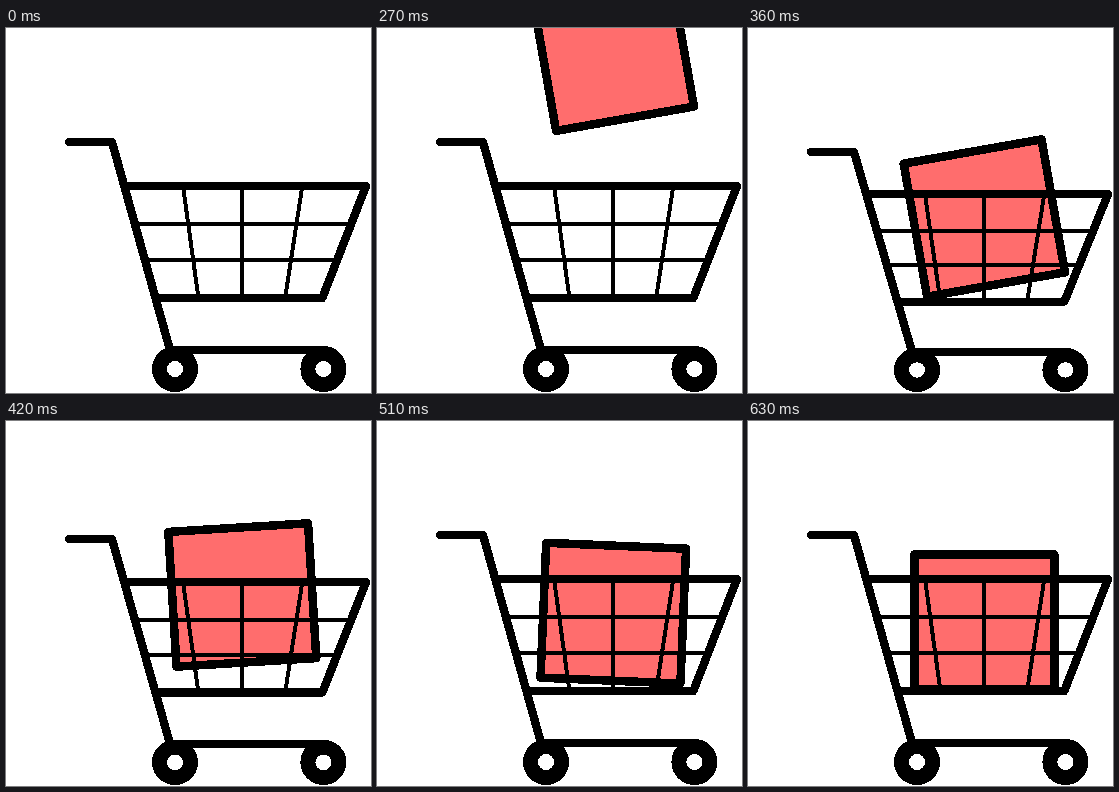
An HTML page for the animation above (2250 ms loop, 365 by 365 pixels).

```html
<!DOCTYPE html>
<html lang="en">
<head>
<meta charset="utf-8">
<title>Box drops into cart</title>
<style>
  html, body { margin: 0; width: 100%; height: 100%; overflow: hidden; background: #fff; }
  svg { display: block; width: 100%; height: 100%; }
  svg * { stroke: #000; stroke-linecap: round; stroke-linejoin: round; }
</style>
</head>
<body>
<svg viewBox="0 0 365 365" shape-rendering="crispEdges">
  <rect id="box" x="-70" y="-67.5" width="140" height="135" fill="#ff6d6d" stroke-width="8.5" visibility="hidden"/>
  <g id="cart" fill="none">
    <path stroke-width="4" d="M130 196H344M140 232H330M177 158L192.3 269M236 158V269M296.3 158L279.3 269"/>
    <path stroke-width="8.4" d="M63 114H106L164 322H317M119 158H360L316.3 270H151"/>
    <g fill="#fff" stroke-width="15">
      <circle cx="169" cy="341" r="15.5"/>
      <circle cx="317.4" cy="341" r="15.5"/>
    </g>
  </g>
</svg>
<script>
  const LOOP = 2250, STEP = 30;
  const DROP = 240, LAND = 360, APEX = 420, REST = 630;
  const FLOOR = 364;
  const box = document.getElementById('box');
  const cart = document.getElementById('cart');

  const progress = (t, from, to) => Math.min(1, Math.max(0, (t - from) / (to - from)));
  const mix = (a, b, p) => a + (b - a) * p;
  const easeOut = p => 1 - (1 - p) ** 2;

  // Steady fall, quick hop, soft settling
  function boxY(t) {
    if (t <= LAND) return mix(-31, 190, progress(t, DROP, LAND));
    if (t <= APEX) return mix(190, 174, easeOut(progress(t, LAND, APEX)));
    return mix(174, 201, easeOut(progress(t, APEX, REST)));
  }

  // Rocks past level during the hop, then back
  function boxTilt(t) {
    return mix(-10, 3, progress(t, LAND, 480)) - 3 * progress(t, 480, REST);
  }

  // Pressed down on impact, springs back
  function cartScale(t) {
    return t < LAND ? 1 : mix(0.96, 1, progress(t, LAND, 460));
  }

  const start = performance.now();

  function draw() {
    const t = Math.floor((performance.now() - start) % LOOP / STEP) * STEP;
    box.setAttribute('visibility', t < DROP ? 'hidden' : 'visible');
    box.setAttribute('transform', `translate(236.3 ${boxY(t)}) rotate(${boxTilt(t)})`);
    const s = cartScale(t);
    cart.setAttribute('transform', `translate(0 ${FLOOR * (1 - s)}) scale(1 ${s})`);
    requestAnimationFrame(draw);
  }
  draw();
</script>
</body>
</html>
```
